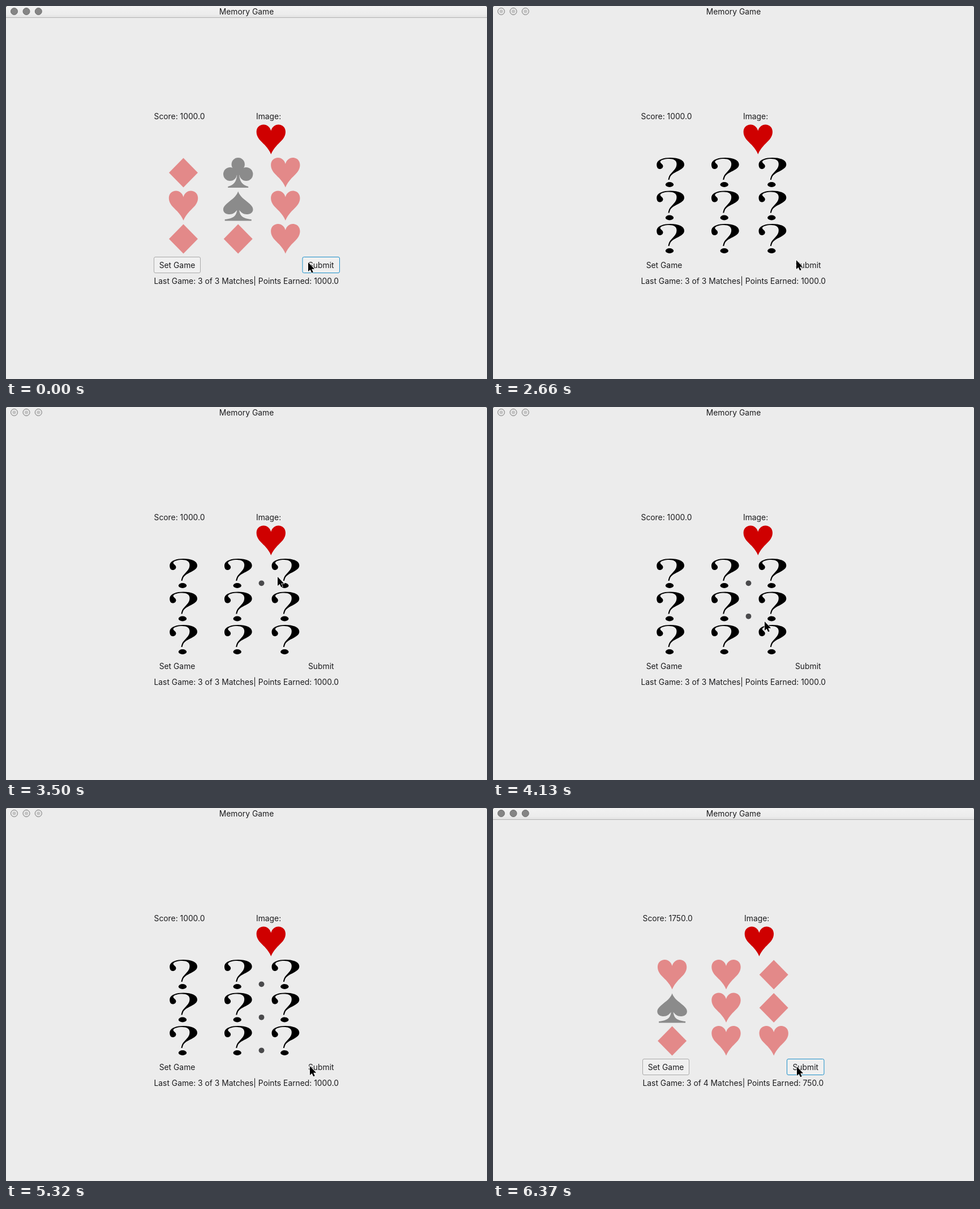
Recreate the animation shown at these times as an HTML page. Size 850x659 px, loop 6.44 s.

```html
<!DOCTYPE html>
<html lang="en">
<head>
<meta charset="utf-8">
<title>Memory Game</title>
<style>
  html, body { margin: 0; width: 100%; height: 100%; overflow: hidden; background: #ececec; }
  svg { display: block; width: 850px; height: 659px; font: 13.85px Inter, Roboto, sans-serif; fill: #1c1c1e; }
  .mid { text-anchor: middle; }
</style>
</head>
<body>
<svg id="stage" viewBox="0 0 850 659">
  <defs>
    <linearGradient id="bar" x2="0" y2="1">
      <stop stop-color="#f2f2f2"/><stop offset=".75" stop-color="#ececec"/><stop offset="1" stop-color="#e2e2e2"/>
    </linearGradient>
    <!-- Card symbols: origin at top centre, about 52 by 52 -->
    <path id="heart" d="M0 11C-2 4-7 0-13 0C-20 0-25.7 5-25.7 13C-25.7 23-18 29-11 36C-6 41.5-2 47 0 52.5C2 47 6 41.5 11 36C18 29 25.7 23 25.7 13C25.7 5 20 0 13 0C7 0 2 4 0 11Z"/>
    <path id="diamond" d="M0 .5L25.5 26.5L0 52.5L-25.5 26.5Z"/>
    <g id="club">
      <circle cy="11.7" r="11.7"/><circle cx="-14.2" cy="29" r="12"/><circle cx="14.2" cy="29" r="12"/>
      <path d="M-4 18H4L6 27L2 31C3 42 7 48 18 51V53H-18V51C-7 48-3 42-2 31L-6 27Z"/>
    </g>
    <path id="spade" d="M0 1C3 10 11 15 18 21C24 26 26.3 29 26.3 33C26.3 39 21 41.5 15 41.5C9 41.5 5 38 2 34C3 44 8 49 23.5 50.5V53H-23.5V50.5C-8 49-3 44-2 34C-5 38-9 41.5-15 41.5C-21 41.5-26.3 39-26.3 33C-26.3 29-24 26-18 21C-11 15-3 10 0 1Z"/>
    <g id="hidden">
      <path d="M-24 10C-22 3-12 0 0 0C14 0 24.5 4 24.5 12C24.5 22 6 24 0 33C-1 35-1.5 37-2 39H-4C-3 34-2 31 1 28C6 22 11 19 11 11C11 5 6 2-2 2C-10 2-17 4-18 7C-18 10-13 11-13 15C-13 18-16 20-19 20C-23 20-25 15-24 10Z"/>
      <ellipse cx="-1.5" cy="47.5" rx="7.2" ry="4.4"/>
    </g>
  </defs>
  <g id="scenes"></g>
  <path id="cursor" d="M0 0V16L3.6 12.7L6.2 18.3L8.8 17.2L6.2 11.7H11.2Z" fill="#000" stroke="#fff" stroke-width="1.4" paint-order="stroke"/>
</svg>
<script>
const LOOP = 6440, STEP = 70;
const GUESS_START = 2520, GUESS_END = 5390;
const PICK_TIMES = [3430, 4130, 4760];
const RED = '#e38989', GREY = '#8b8b8b';
const BLACK_SUITS = ['club', 'spade'];

// [time, x, y] of the pointer tip
const POINTER = [
  [0, 534, 453], [560, 534, 453], [840, 535, 453], [2520, 535, 453], [2730, 536, 448],
  [3150, 482, 304], [3290, 480, 300], [3570, 480, 300], [4060, 480, 379], [4200, 480, 379],
  [4690, 480, 437], [4830, 480, 437], [5250, 537, 456], [5390, 537, 456], [5530, 537, 457], [LOOP, 537, 457]
];

const text = (x, y, s, cls = '') => `<text x="${x}" y="${y}" class="${cls}">${s}</text>`;
const symbol = (id, x, y, fill) => `<use href="#${id}" x="${x}" y="${y}" fill="${fill}"/>`;
const tint = card => card === 'hidden' ? '#000' : BLACK_SUITS.includes(card) ? GREY : RED;

function titleBar(active) {
  const light = x => active
    ? `<circle cx="${x}" cy="9.5" r="6" fill="#858585" stroke="#6c6c6c"/>`
    : `<circle cx="${x}" cy="9.5" r="6" fill="#e8e8e8" stroke="#777"/><circle cx="${x}" cy="9.5" r="3" fill="#c4c4c4"/>`;
  const bar = active ? '<path d="M0 0H850V20H0Z" fill="url(#bar)"/><path d="M0 20.5H850" stroke="#b3b3b3"/>' : '';
  return bar + '<path d="M0 0H2L0 2ZM850 0H848L850 2Z" fill="#555"/>'
    + [14.5, 36, 57.3].map(light).join('') + text(425, 15, 'Memory Game', 'mid');
}

function button(x, width, label, stroke, framed) {
  const frame = `<rect x="${x}" y="443.5" width="${width}" height="28" rx="2.5" fill="#f0f0f0" stroke="${stroke}"/>`;
  return (framed ? frame : '') + text(x + width / 2, 462.5, label, 'mid');
}

function scene({ left, right, columns, imageX, score, summary, cards, active }) {
  const grid = cards.map((card, i) =>
    symbol(card, columns[i % 3], 268 + 58.5 * Math.floor(i / 3), tint(card)));
  return '<g>' + titleBar(active)
    + text(left, 200, 'Score: ' + score) + text(imageX - 26.3, 200, 'Image:')
    + symbol('heart', imageX, 209.5, '#cf0000') + grid.join('')
    + button(left, 82, 'Set Game', '#a9a9a9', active)
    + button(right - 65.5, 65.5, 'Submit', '#1b8fc9', active)
    + text(left, 491, 'Last Game: ' + summary) + '</g>';
}

const first = {
  left: 261.5, right: 589.5, columns: [313.5, 410.2, 493.8], imageX: 468.3, active: true,
  score: '1000.0', summary: '3 of 3 Matches| Points Earned: 1000.0',
  cards: ['diamond', 'club', 'heart', 'heart', 'spade', 'heart', 'diamond', 'diamond', 'heart']
};
const guessing = { ...first, active: false, cards: Array(9).fill('hidden') };
const second = {
  left: 264.5, right: 585, columns: [316.6, 412, 496.2], imageX: 470.4, active: true,
  score: '1750.0', summary: '3 of 4 Matches| Points Earned: 750.0',
  cards: ['heart', 'heart', 'diamond', 'spade', 'heart', 'diamond', 'diamond', 'heart', 'heart']
};

const root = document.getElementById('scenes');
const cursor = document.getElementById('cursor');
root.innerHTML = [first, guessing, second].map(scene).join('');
const views = [...root.children];
views[1].insertAdjacentHTML('beforeend', PICK_TIMES.map((_, i) =>
  `<circle class="pick" cx="451.5" cy="${311.3 + 58.5 * i}" r="4.9" fill="#4a4a4c"/>`).join(''));
const picks = root.querySelectorAll('.pick');

const show = (el, visible) => { el.style.display = visible ? '' : 'none'; };

function pointerAt(t) {
  const i = POINTER.findIndex(key => key[0] > t);
  const [t0, x0, y0] = POINTER[i - 1], [t1, x1, y1] = POINTER[i];
  const u = (t - t0) / (t1 - t0), k = u * u * (3 - 2 * u);
  return [x0 + (x1 - x0) * k, y0 + (y1 - y0) * k].map(Math.round);
}

function draw(now) {
  const t = Math.floor((now % LOOP) / STEP) * STEP;
  const current = t < GUESS_START ? 0 : t < GUESS_END ? 1 : 2;
  views.forEach((view, i) => show(view, i === current));
  picks.forEach((pick, i) => show(pick, t >= PICK_TIMES[i]));
  cursor.setAttribute('transform', `translate(${pointerAt(t)})`);
  requestAnimationFrame(tick);
}

let start;
function tick(now) {
  start ??= now;
  draw(Math.max(0, now - start));
}
draw(0);
</script>
</body>
</html>
```
